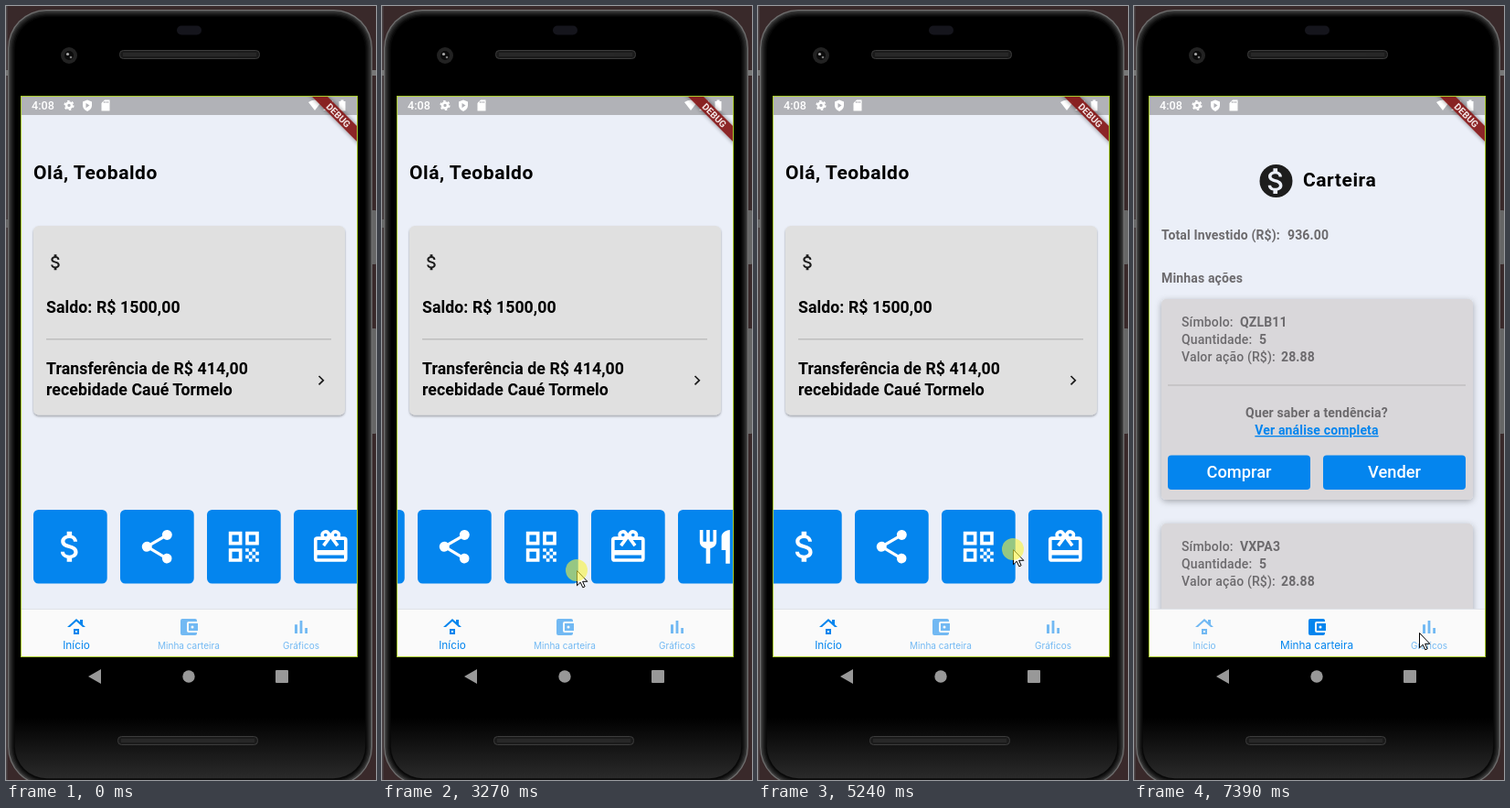
Recreate the animation shown at these times as an HTML page. Size 405 px wide and 845 px high, loop 8000 ms.

```html
<!DOCTYPE html>
<html lang="pt">
<head>
<meta charset="utf-8">
<style>
html, body { margin: 0; width: 100%; height: 100%; overflow: hidden; background: #39292a; }
svg { display: block; }
text { font-family: Roboto, sans-serif; font-weight: 700; white-space: pre; }
.h { font-size: 21px; letter-spacing: .55px; }
.b { font-size: 17.7px; letter-spacing: .07px; }
.s { font-size: 14px; letter-spacing: .15px; fill: #6c6a6d; }
.m { font-weight: 500; }
.btn { font-size: 18.3px; font-weight: 500; fill: #fff; text-anchor: middle; }
.c { text-anchor: middle; }
.nav text { font-family: Inter, sans-serif; font-weight: 400; text-anchor: middle; }
</style>
</head>
<body>
<script>
const BLUE = '#0485ee', BG = '#ebeff8';

// 24-unit icon outlines
const icons = {
  money: 'M11.8 10.9c-2.27-.59-3-1.2-3-2.15 0-1.09 1.01-1.85 2.7-1.85 1.78 0 2.44.85 2.5 2.1h2.21c-.07-1.72-1.12-3.3-3.21-3.81V3h-3v2.16c-1.94.42-3.5 1.68-3.5 3.61 0 2.31 1.91 3.46 4.7 4.13 2.5.6 3 1.48 3 2.41 0 .69-.49 1.79-2.7 1.79-2.06 0-2.87-.92-2.98-2.1h-2.2c.12 2.19 1.76 3.42 3.68 3.83V21h3v-2.15c1.95-.37 3.5-1.5 3.5-3.55 0-2.84-2.43-3.81-4.7-4.4z',
  share: 'M18 16.1c-.8 0-1.4.3-2 .8L8.9 12.7a3 3 0 0 0 0-1.4L16 7.2A3 3 0 1 0 15.1 5.7L8 9.8A3 3 0 1 0 8 14.2l7.1 4.2A2.9 2.9 0 1 0 18 16.1z',
  qr: 'M3 11h8V3H3zm2-6h4v4H5zM3 21h8v-8H3zm2-6h4v4H5zM13 3v8h8V3zm6 6h-4V5h4zM19 19h2v2h-2zM13 13h2v2h-2zM15 15h2v2h-2zM13 17h2v2h-2zM15 19h2v2h-2zM17 17h2v2h-2zM17 13h2v2h-2zM19 15h2v2h-2z',
  gift: 'M20 6h-2.2A3 3 0 0 0 12.5 3.35L12 4l-.5-.65A3 3 0 0 0 6.2 6H4a2 2 0 0 0-2 2v11a2 2 0 0 0 2 2h16a2 2 0 0 0 2-2V8a2 2 0 0 0-2-2zm-5-2a1 1 0 1 1 0 2 1 1 0 0 1 0-2zM9 4a1 1 0 1 1 0 2 1 1 0 0 1 0-2zm11 15H4v-2h16zm0-5H4V8h5.1L7 10.8 8.6 12 12 7.4 15.4 12 17 10.8 14.9 8H20z',
  food: 'M11 9H9V2H7v7H5V2H3v7c0 2.1 1.7 3.8 3.75 4V22h2.5v-9C11.3 12.8 13 11.1 13 9V2h-2zm5-3v8h2.5v8H21V2c-2.8 0-5 2.2-5 4z',
  home: 'M13 18h-2v-2h2zm2-4H9v6h6zm4-4.7V4h-3v2.6L12 3 2 12h3l7-6.3L19 12h3z',
  wallet: 'M21 18v1a2 2 0 0 1-2 2H5a2 2 0 0 1-2-2V5a2 2 0 0 1 2-2h14a2 2 0 0 1 2 2v1h-9a2 2 0 0 0-2 2v8a2 2 0 0 0 2 2zm-9-2h10V8H12zm4-2.5a1.5 1.5 0 1 1 0-3 1.5 1.5 0 0 1 0 3z',
  chart: 'M5 9.2h3V19H5zM10.6 5h2.8v14h-2.8zM16.2 13H19v6h-2.8z',
};
const icon = (name, x, y, size, fill = '#fff') =>
  `<path d="${icons[name]}" fill="${fill}" fill-rule="evenodd" transform="translate(${x} ${y}) scale(${size / 24}) translate(-12 -12)"/>`;
const rect = (x, y, w, h, fill, r = 0, more = '') =>
  `<rect x="${x}" y="${y}" width="${w}" height="${h}" rx="${r}" fill="${fill}" ${more}/>`;
const text = (x, y, cls, str, more = '') => `<text x="${x}" y="${y}" class="${cls}" ${more}>${str}</text>`;
const field = (y, label, value, x) => text(52, y, 's m', label) + text(x, y, 's', value);

const tiles = ['money', 'share', 'qr', 'gift', 'food'].map((name, i) =>
  rect(30 + 95 * i, 550, 80.7, 80.5, BLUE, 5.5) + icon(name, 70.3 + 95 * i, 590.3, 44)).join('');

const tabs = [['home', 'Início'], ['wallet', 'Minha carteira'], ['chart', 'Gráficos']].map(([name, label], i) =>
  `<g class="nav" fill="${BLUE}">${icon(name, 77 + 123 * i, 678, 24, BLUE)}${text(77 + 123 * i, 701.5, '', label)}</g>`).join('');

const stockCard = (y, symbol) => `<g transform="translate(0 ${y})">
  ${rect(30, 0, 341, 219, '#d9d7da', 5, 'filter="url(#deep)"')}
  ${field(29.5, 'Símbolo:', symbol, 116)}${field(48.5, 'Quantidade:', '5', 137)}${field(67.5, 'Valor ação (R$):', '28.88', 161)}
  ${rect(37, 93.5, 326, 1, '#b5b3b6')}
  ${text(200, 129, 's c', 'Quer saber a tendência?')}
  ${text(200, 148, 's c', 'Ver análise completa', `style="fill:${BLUE}" text-decoration="underline"`)}
  ${rect(37, 170.5, 156, 37.5, BLUE, 4)}${rect(207, 170.5, 156, 37.5, BLUE, 4)}
  ${text(115, 194.5, 'btn', 'Comprar')}${text(285, 194.5, 'btn', 'Vender')}</g>`;

const grille = (x, y) => rect(x, y, 153, 9, '#1b1b1b', 4, 'stroke="#3c3c3c"') +
  `<path d="M${x + 4} ${y + 4.5}h145" stroke="#343434" stroke-width="4" stroke-dasharray="1 1"/>`;

// Nested outlines shade the rounded bezel from its bright rim to black.
const bezel = ['#6e6e6e', '#3a3a3a', '#2a2a2a', '#1e1e1e', '#121212', '#080808'].map((shade, i) =>
  rect(2 + i * 1.3, 4 + i * 1.3, 399 - i * 2.6, 847 - i * 2.6, shade, 42 - i * 1.3)).join('');

const phone = `
  ${rect(0, 0, 1.5, 845, '#4d4648')}${rect(0, 70, 4, 6, '#777')}${rect(0, 233, 4, 9, '#666')}
  ${rect(400, 223, 5, 59, '#666', 1)}${rect(400, 352, 5, 115, '#666', 1)}${rect(400, 70, 5, 6, '#777')}
  ${bezel}${rect(9.8, 11.8, 383.4, 831.4, 'url(#body)', 35)}
  ${rect(187, 21.5, 27, 10, '#15151c', 5)}${grille(124.5, 48.5)}${grille(122.5, 797.5)}
  <circle cx="69" cy="54" r="9" fill="#222"/><circle cx="69" cy="54" r="5" fill="#0b0b0b"/>
  <circle cx="67.5" cy="52.5" r="1.6" fill="#aaa"/><circle cx="71" cy="56" r="1.3" fill="#777"/>
  <path d="M90 732l14-8v16z" fill="#989898"/><circle cx="200" cy="732" r="6.7" fill="#989898"/>
  ${rect(295, 725, 14, 14, '#989898', 1)}`;

const statusBar = `
  ${rect(16, 98, 369, 21, '#b1b2b7')}
  ${text(28, 113.3, 'm', '4:08', 'font-size="12.6" fill="#fff"')}
  <circle cx="69" cy="108.5" r="3" fill="none" stroke="#fff" stroke-width="2.6"/>
  <circle cx="69" cy="108.5" r="4.8" fill="none" stroke="#fff" stroke-width="1.6" stroke-dasharray="2.5 2.53"/>
  <path d="M89 102.5l5 2v4q0 4-5 6.5-5-2.5-5-6.5v-4z" fill="#fff"/><path d="M87.5 106l4 2.6-4 2.6z" fill="#b1b2b7"/>
  <path d="M104.5 106l3.500-3.500h5.500v12h-9z" fill="#fff"/><path d="M107.5 106v-2m2 2v-2m2 2v-2" stroke="#b1b2b7"/>
  <path d="M331 105q7-5 14 0l-7 9z M347 114l11-11v11z" fill="#fff"/>
  <path d="M364.5 104h2v-1.500h3v1.500h2v10.500h-7z" fill="#fff"/>
  <g transform="translate(363.9 119.3) rotate(45)">
    ${rect(-50, -6, 100, 12, '#851819', 0, 'opacity=".92" filter="url(#bannerShadow)"')}
    ${text(0, 3.7, 'c', 'DEBUG', 'font-size="10.2" fill="#f3e6e6"')}
  </g>`;

const homePage = `
  ${text(30, 189, 'h', 'Olá, Teobaldo')}
  ${rect(30, 240, 341, 206.5, '#e0e0e0', 6, 'filter="url(#soft)"')}
  ${icon('money', 54.5, 279.7, 22.5, '#1c1c1c')}
  ${text(44, 335, 'b', 'Saldo: R$ 1500,00')}
  ${rect(44, 363, 312, 1.5, '#bfbfbf')}
  ${text(44, 401.5, 'b', 'Transferência de R$ 414,00')}${text(44, 424.5, 'b', 'recebidade Caué Tormelo')}
  <path d="M342.5 404l4.8 4.7-4.8 4.7" fill="none" stroke="#1c1c1c" stroke-width="1.7"/>
  <g id="tiles">${tiles}</g>
  <g clip-path="url(#list)" fill="#2196f3"><ellipse id="glowR" cx="385" cy="590" rx="18" ry="60"/><ellipse id="glowL" cx="16" cy="590" rx="18" ry="60"/></g>`;

const walletPage = `
  <circle cx="155.5" cy="191" r="18" fill="#1d1d1d"/>${icon('money', 155.5, 191, 37, BG)}
  ${text(185, 196.5, 'h', 'Carteira')}
  ${text(30, 254.5, 's', 'Total Investido (R$):')}${text(168, 254.5, 's', '936.00')}
  ${text(30, 302, 's', 'Minhas ações')}
  ${stockCard(320, 'QZLB11')}${stockCard(565, 'VXPA3')}`;

document.body.innerHTML = `<svg width="405" height="845" viewBox="0 0 405 845">
  <defs>
    <clipPath id="screen">${rect(16, 98, 369, 613, '#000')}</clipPath>
    <clipPath id="list">${rect(16, 550, 369, 81, '#000')}</clipPath>
    <linearGradient id="body" x2="0" y2="1"><stop offset=".92"/><stop offset="1" stop-color="#2a2a2a"/></linearGradient>
    <filter id="soft"><feDropShadow dx="0" dy="1.5" stdDeviation="1.3" flood-opacity=".35"/></filter>
    <filter id="deep"><feDropShadow dx="0" dy="2" stdDeviation="3.5" flood-opacity=".3"/></filter>
    <filter id="bannerShadow" y="-1" height="3"><feDropShadow dx="0" dy="0" stdDeviation="2.5" flood-opacity=".5"/></filter>
  </defs>
  ${phone}
  <g clip-path="url(#screen)">
    ${rect(16, 98, 369, 613, BG)}
    <g id="home">${homePage}</g><g id="wallet">${walletPage}</g>
    ${rect(16, 658, 369, 1, '#dfe2e8')}${rect(16, 659, 369, 52, '#fafafa')}${tabs}${statusBar}
  </g>
  ${rect(16.5, 98.5, 368, 612, 'none', 0, 'stroke="#a9cc2b"')}
  <g id="cursor">
    <path d="M.5.5v16.3l3.7-3.6 2.6 5.6 2.3-1-2.5-5.5h5.2z" fill="#fff" stroke="#000"/>
    <circle id="press" r="12" fill="#f8f43c" opacity=".6"/>
  </g></svg>`;

const $ = id => document.getElementById(id);
const navTabs = document.querySelectorAll('.nav');
const STEP = 70;

function track(keys, t) {
  const i = keys.findLastIndex(k => k[0] <= t);
  if (i < 0) return keys[0].slice(1);
  const a = keys[i], b = keys[i + 1] || a;
  const held = Math.floor((t - a[0]) / STEP) * STEP;
  const p = b === a ? 0 : held / (b[0] - a[0]);
  return a.slice(1).map((v, j) => v + (b[j + 1] - v) * p);
}

const pointer = [
  [460, 352, 838], [800, 290, 772], [1230, 211, 720], [1650, 192, 677], [2310, 192, 677],
  [2380, 191, 670], [2520, 303, 609], [2910, 303, 609], [3270, 213, 616], [3760, 157, 618],
  [3830, 150, 614], [4610, 114, 601], [4680, 113, 600], [4820, 135, 599], [5100, 245, 595],
  [5240, 279, 593], [5370, 286, 593], [5440, 286, 593], [5860, 192, 672], [5990, 192, 672],
  [6060, 192, 675], [6420, 192, 675], [6980, 301, 682], [7110, 301, 682], [7390, 312, 684],
];
const scroll = [[2910, 0], [3270, 86], [3340, 106], [4820, 106], [5240, 19], [5370, 0]];
const glowRight = [[3340, 0], [3760, .22], [4540, 0]];
const glowLeft = [[5370, 0], [5510, .18], [5860, 0]];
const tabSwitch = [[6350, 0], [6420, .3], [6630, 1]];
const presses = [[2720, 3830], [4750, 5510], [6060, 6130]];

function draw() {
  const t = performance.now() % 8000;
  const [x, y] = track(pointer, t);
  $('cursor').setAttribute('transform', `translate(${x} ${y})`);
  $('cursor').style.display = t < 460 ? 'none' : '';
  $('press').style.display = presses.some(([on, off]) => t >= on && t < off) ? '' : 'none';
  $('tiles').setAttribute('transform', `translate(${-track(scroll, t)[0]} 0)`);
  $('glowR').style.opacity = track(glowRight, t)[0];
  $('glowL').style.opacity = track(glowLeft, t)[0];

  const onWallet = t >= 6420, k = track(tabSwitch, t)[0];
  $('home').style.display = onWallet ? 'none' : '';
  $('wallet').style.display = onWallet ? '' : 'none';
  [1 - k, k, 0].forEach((active, i) => {
    navTabs[i].style.opacity = .55 + .45 * active;
    navTabs[i].style.fontSize = 10 + 1.8 * active + 'px';
  });
  requestAnimationFrame(draw);
}
draw();
</script>
</body>
</html>
```
